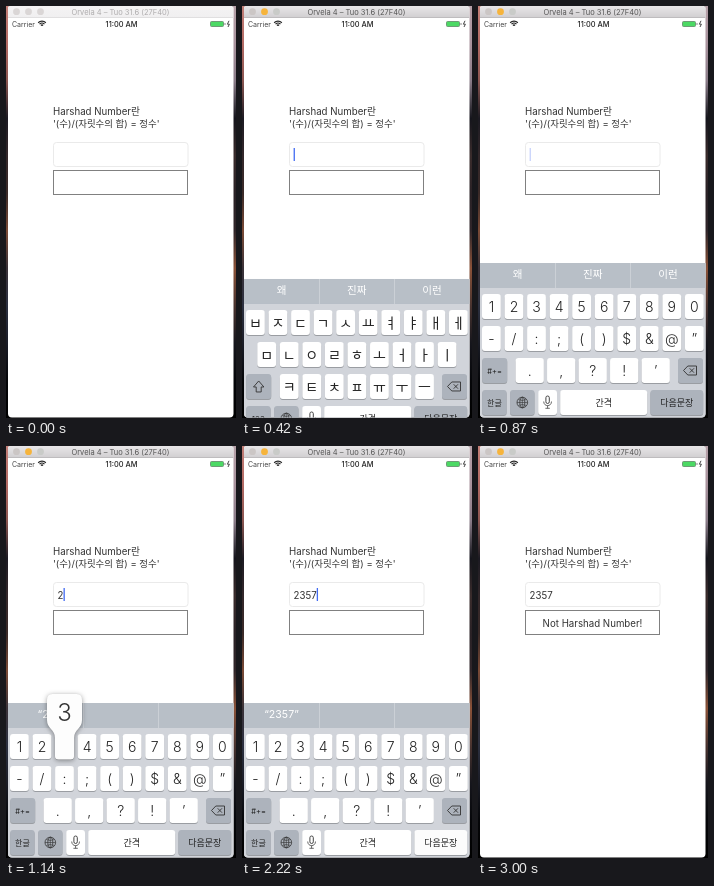
Animation, 230 px wide and 412 px high, one loop 3030 ms. Source, as an HTML page with a canvas:

```html
<!DOCTYPE html>
<html lang="ko">
<head>
<meta charset="utf-8">
<style>
html, body { margin: 0; width: 100%; height: 100%; overflow: hidden; background: #000; }
canvas { display: block; }
</style>
</head>
<body>
<canvas id="stage" width="230" height="412"></canvas>
<script>
const ctx = document.getElementById('stage').getContext('2d');
const LOOP = 3030, STEP = 30;
const FONT = 'Inter, "Noto Sans CJK KR", "Noto Sans CJK", sans-serif';
const KEYBOARD_HEIGHT = 155;
const COLUMN = 22.55, FIRST = 13.4;

// Digit presses: the value changes on release
const presses = [
  { digit: 2, down: 900, up: 1020 },
  { digit: 3, down: 1110, up: 1230 },
  { digit: 5, down: 1410, up: 1530 },
  { digit: 7, down: 1800, up: 1950 }
];
const ACTIVATE = 30, FOCUS = 60, SHOW = 342, NUMERIC = 600, RETURN_DOWN = 2190, SUBMIT = 2300;

const clamp = v => Math.max(0, Math.min(1, v));
const easeOut = p => 1 - (1 - clamp(p)) ** 4;

function text(str, x, y, size, color = '#333', align = 'center', weight = 400) {
  ctx.font = `${weight} ${size}px ${FONT}`;
  ctx.fillStyle = color;
  ctx.textAlign = align;
  ctx.fillText(str, x, y);
}

function rect(x, y, w, h, color) {
  ctx.fillStyle = color;
  ctx.fillRect(x, y, w, h);
}

function round(x, y, w, h, r, fill, stroke) {
  ctx.beginPath();
  ctx.roundRect(x, y, w, h, r);
  if (fill) { ctx.fillStyle = fill; ctx.fill(); }
  if (stroke) { ctx.strokeStyle = stroke; ctx.stroke(); }
}

function disc(x, y, r, fill) {
  ctx.beginPath();
  ctx.arc(x, y, r, 0, 7);
  ctx.fillStyle = fill;
  ctx.fill();
}

function line(path, color = '#333', width = 0.9) {
  ctx.strokeStyle = color;
  ctx.lineWidth = width;
  ctx.stroke(new Path2D(path));
  ctx.lineWidth = 1;
}

function wallpaper(x, colors) {
  const g = ctx.createLinearGradient(0, 0, 0, 412);
  colors.forEach((c, i) => g.addColorStop(i / (colors.length - 1), c));
  rect(x, 0, 3, 412, g);
}

function titleBar(active) {
  const g = ctx.createLinearGradient(0, 0, 0, 12);
  g.addColorStop(0, active ? '#e8e6e8' : '#f4f3f4');
  g.addColorStop(1, active ? '#d0ced0' : '#f0eff0');
  round(2, 0, 225.5, 12, [2, 2, 0, 0], g);
  rect(2, 11, 225.5, 1, active ? '#bebcbe' : '#e0dfe0');
  const lights = active ? ['#cbc6c5', '#f6b43c', '#c9cbc8'] : ['#dad6d6', '#dad6d6', '#dad6d6'];
  lights.forEach((c, i) => disc(10.5 + 12 * i, 5.7, 3.4, c));
  text('Orvela 4 – Tuo 31.6 (27F40)', 114.5, 8.6, 7.5, active ? '#555' : '#aeacad');
}

function statusBar() {
  text('Carrier', 6, 20.6, 7, '#444', 'left');
  for (const r of [1.5, 3.5, 5.4]) {
    ctx.beginPath();
    ctx.arc(36, 20.6, r, -Math.PI * 0.75, -Math.PI * 0.25);
    ctx.strokeStyle = '#222';
    ctx.lineWidth = 1.2;
    ctx.stroke();
    ctx.lineWidth = 1;
  }
  text('11:00 AM', 115.5, 20.6, 7.4, '#222', 'center', 500);
  round(204.5, 15.5, 13, 5, 1, '#4cd964', '#6f9a77');
  rect(218.5, 17, 1, 2, '#888');
  line('M223 14.8L221.4 18.2H223.4L222 21');
}

function page(value, done, caretAlpha) {
  text('Harshad Number란', 47, 109.2, 9.7, '#333', 'left');
  text("'(수)/(자릿수의 합) = 정수'", 47, 121.2, 9.45, '#333', 'left');
  round(47.5, 136.5, 134.5, 24, 3, '#fff', '#eaeaea');
  text(value, 51.5, 152.8, 9.7, '#333', 'left');
  if (caretAlpha > 0) {
    ctx.globalAlpha = caretAlpha;
    rect(51.6 + ctx.measureText(value).width, 142, 1.3, 13, '#426bf2');
    ctx.globalAlpha = 1;
  }
  ctx.strokeStyle = '#808080';
  ctx.strokeRect(47.5, 164.5, 134, 24);
  if (done) text('Not Harshad Number!', 114.5, 180.7, 9.7, '#333');
}

function key(cx, y, w, label = '', size = 14, color = '#fff', weight = 400) {
  round(cx - w / 2, y + 1, w, 25, 3, '#9a9da2');
  round(cx - w / 2, y, w, 25, 3, color);
  text(label, cx, y + 12.8 + size * 0.36, size, '#222', 'center', weight);
}

function keyRow(labels, y, cx = FIRST, gap = COLUMN, width = 18.8) {
  [...labels].forEach((c, i) => key(cx + gap * i, y, width, c, 14, '#fff', 300));
}

function popup(digit) {
  const x = FIRST + COLUMN * (digit - 1);
  ctx.save();
  ctx.translate(x, 0);
  ctx.shadowColor = 'rgba(0,0,0,.4)';
  ctx.shadowBlur = 5;
  ctx.shadowOffsetY = 1;
  ctx.fillStyle = '#fdfdfd';
  ctx.fill(new Path2D('M-12 248H12Q17.5 248 17.5 254V274C17.5 283 9.5 283 9.5 292V310Q9.5 313.5 6 313.5H-6Q-9.5 313.5 -9.5 310V292C-9.5 283 -17.5 283 -17.5 274V254Q-17.5 248 -12 248Z'));
  ctx.restore();
  text(digit, x, 274.8, 24, '#333', 'center', 300);
}

function keyboard(t, value) {
  const gray = '#adb3bc';
  const numeric = t >= NUMERIC;
  rect(2, 257, 226, 156, '#d1d4da');
  rect(2, 257, 226, 25, '#b8bfc7');
  for (const x of [77, 152]) rect(x, 257, 1, 25, '#cbd0d6');
  const hints = value ? [`“${value}”`] : ['왜', '진짜', '이런'];
  hints.forEach((h, i) => text(h, 39.5 + 75.3 * i, 272, 10.6, '#fff'));

  if (numeric) {
    keyRow('1234567890', 288);
    keyRow('-/:;()$&@”', 320);
    keyRow('.,?!’', 352, 51.7, 31.5, 28.3);
    key(16.7, 352, 25, '#+=', 7.5, gray);
  } else {
    keyRow('ㅂㅈㄷㄱㅅㅛㅕㅑㅐㅔ', 288);
    keyRow('ㅁㄴㅇㄹㅎㅗㅓㅏㅣ', 320, FIRST + COLUMN / 2);
    keyRow('ㅋㅌㅊㅍㅠㅜㅡ', 352, FIRST + COLUMN * 1.5);
    key(16.7, 352, 25, '', 8, gray);
    line('M16.7 359L11.5 365H14.2V370H19.2V365H21.9Z');
  }
  key(212.5, 352, 25, '', 8, gray);
  line('M205.5 364.5L209.8 360H218.5V369H209.8ZM211.7 362.3L216 366.7M216 362.3L211.7 366.7');

  key(16.4, 384, 24.4, numeric ? '한글' : '123', 8, gray);
  key(44.3, 384, 24.4, '', 8, gray);
  line('M39 396.5A5.3 5.3 0 0 1 49.6 396.5A5.3 5.3 0 0 1 39 396.5M41.8 396.5A2.5 5.3 0 0 1 46.8 396.5A2.5 5.3 0 0 1 41.8 396.5', '#333', 0.8);
  line('M39 396.5H49.6M44.3 391.3V401.7M40.5 393.6Q44.3 395.4 48.1 393.6M40.5 399.4Q44.3 397.6 48.1 399.4', '#333', 0.6);
  key(69.6, 384, 18.8);
  round(67.9, 390, 3.4, 7.5, 1.7, null, '#444');
  line('M65.7 395.5C65.7 401 73.5 401 73.5 395.5M69.6 399.6V402.3M67.4 402.3H71.8', '#444', 0.8);
  key(125.7, 384, 87, '간격', 9);
  const pressed = t >= RETURN_DOWN && t < SUBMIT;
  key(198.8, 384, 52.8, '다음문장', 9, pressed ? '#fcfcfc' : gray);

  const press = presses.find(p => t >= p.down && t < p.up);
  if (press) popup(press.digit);
}

function draw(t) {
  const value = presses.filter(p => t >= p.up).map(p => p.digit).join('');
  const done = t >= SUBMIT;
  const blink = clamp(0.3 + 1.2 * Math.cos((t - FOCUS) / 360 * 2 * Math.PI));
  const caret = t >= FOCUS && !done ? blink : 0;
  const shown = done ? 1 - easeOut((t - SUBMIT) / 140) : easeOut((t - SHOW) / 180);

  rect(0, 0, 230, 412, '#000');
  wallpaper(0, ['#c27f78', '#b36a64', '#8a5550', '#1c1a22', '#33272a', '#3a2a28', '#7a4a36', '#3a3238', '#2c3040', '#1a1c26', '#050609', '#000']);
  wallpaper(227, ['#b5a0a8', '#a9939d', '#8a7c88', '#15151c', '#3a2c2c', '#2a2226', '#30262a', '#8a5238', '#4a3430', '#16161c', '#050609', '#000']);

  ctx.save();
  ctx.beginPath();
  ctx.roundRect(2, 0, 225.5, 411.5, [2, 2, 4, 4]);
  ctx.clip();
  rect(0, 0, 230, 412, '#fff');
  titleBar(t >= ACTIVATE);
  statusBar();
  page(value, done, caret);
  if (shown > 0) {
    ctx.translate(0, KEYBOARD_HEIGHT * (1 - shown));
    keyboard(t, value);
  }
  ctx.restore();
}

function tick() {
  const t = performance.now() % LOOP;
  draw(Math.floor(t / STEP) * STEP);
  requestAnimationFrame(tick);
}
tick();
</script>
</body>
</html>
```
